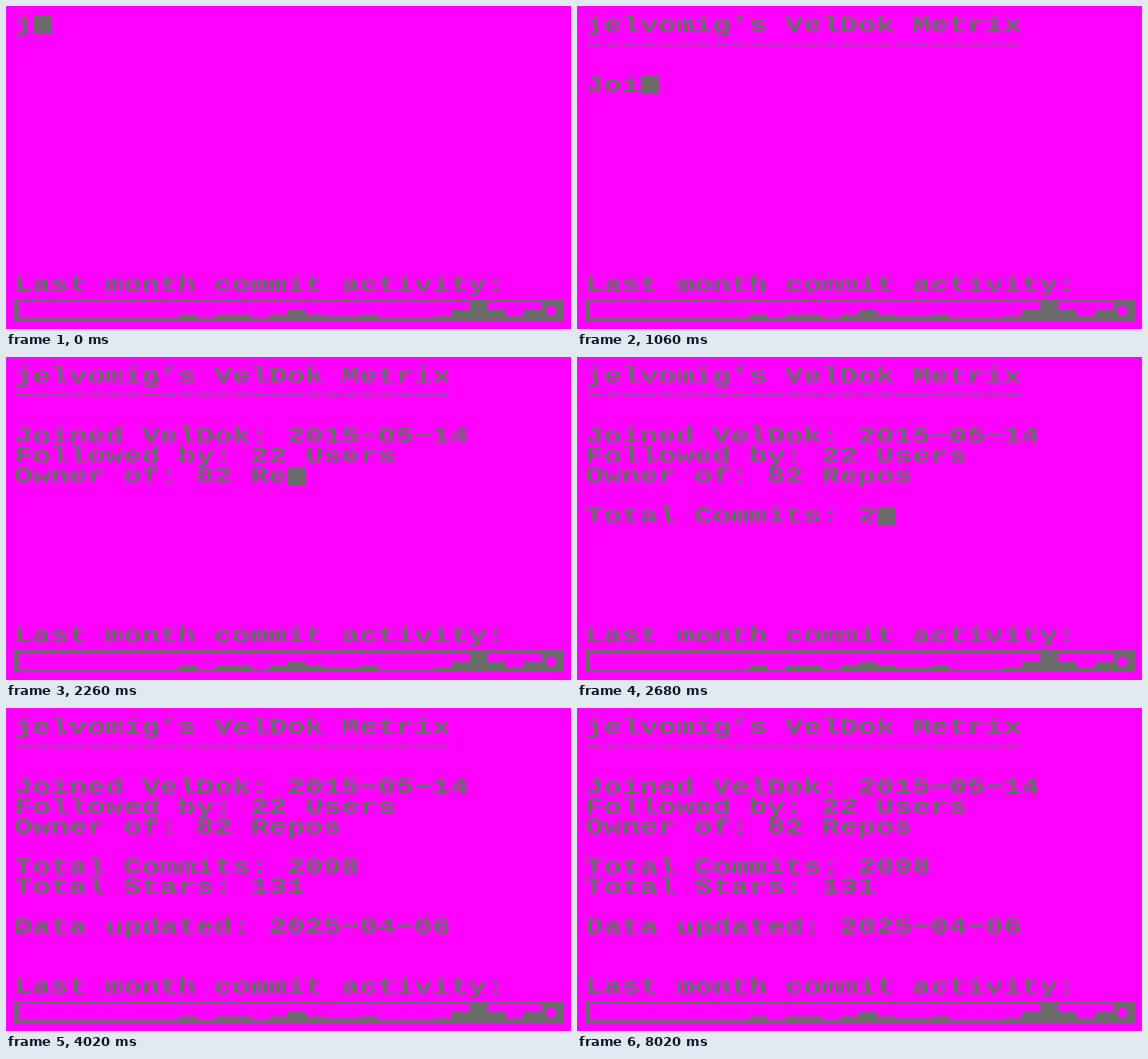
Animation, 622 px wide and 356 px high, one loop 8.42 s. Source, as an HTML page:

```html
<!DOCTYPE html>
<html lang="en">
<head>
<meta charset="utf-8">
<title>Commit metrics terminal</title>
<style>
  html, body { margin: 0; width: 100%; height: 100%; overflow: hidden; background: #f0f; }
  svg { display: block; width: 100vw; height: 100vh; fill: #696969; }
  text {
    font: bold 25px "Liberation Mono", "Courier New", monospace;
    white-space: pre;
    text-rendering: geometricPrecision;
  }
  .rule { font-weight: normal; }
  rect { shape-rendering: crispEdges; }
</style>
</head>
<body>
<svg viewBox="0 0 622 356">
  <rect width="622" height="356" fill="#f0f"/>
  <!-- wide terminal face: 20px columns, 22px rows -->
  <g id="rows" transform="translate(9 27.6) scale(1.3333 1)"></g>
  <g id="chart"></g>
  <rect id="cursor" width="20" height="20"/>
</svg>
<script>
const NS = "http://www.w3.org/2000/svg";
const LOOP = 8420, STEP = 20, BLINK_START = 4020, BLINK = 400;
const COL = 20, ROW = 22, LEFT = 10;

const script = [
  "jelvomig\u2019s VelDok Metrix",
  "-".repeat(24),
  "",
  "Joined VelDok: 2015-05-14",
  "Followed by: 22 Users",
  "Owner of: 82 Repos",
  "",
  "Total Commits: 2098",
  "Total Stars: 131",
  "",
  "Data updated: 2025-04-06"
];
const full = script.join("\n");

const rowsBox = document.getElementById("rows");
const chart = document.getElementById("chart");
const cursor = document.getElementById("cursor");

function add(parent, tag, attrs) {
  const el = document.createElementNS(NS, tag);
  for (const key in attrs) el.setAttribute(key, attrs[key]);
  return parent.appendChild(el);
}

function box(x, y, width, height) {
  add(chart, "rect", { x, y, width, height });
}

const rows = script.map((line, i) =>
  add(rowsBox, "text", { y: i * ROW, class: line.startsWith("-") ? "rule" : "" }));
add(rowsBox, "text", { y: 13 * ROW }).textContent = "Last month commit activity:";

function drawChart() {
  const left = 9, right = 614, top = 323, bottom = 347;
  box(left, top, right - left, 3);
  box(left, bottom - 3, right - left, 3);
  box(left, top, 5, bottom - top);
  box(right - 4, top, 4, bottom - top);
  // bar heights by column, starting at column 9
  const bars = [7, 0, 7, 7, 0, 7, 12, 7, 5, 5, 7, 0, 0, 0, 5, 12, 24, 12, 5, 12, 24];
  bars.forEach((h, i) => {
    if (h) box(LEFT + (i + 9) * COL, bottom - h, COL, h);
  });
  add(chart, "ellipse", { cx: 600, cy: 335.5, rx: 5.5, ry: 5.5, fill: "#f0f" });
}

function draw(time) {
  const t = time % LOOP;
  const count = Math.min(full.length, Math.floor(t / STEP) + 1);
  const typed = full.slice(0, count).split("\n");
  rows.forEach((row, i) => {
    const line = (typed[i] || "").replace(/-/g, "\u2212");
    if (row.textContent !== line) row.textContent = line;
  });

  const last = typed.length - 1;
  cursor.setAttribute("x", LEFT + typed[last].length * COL);
  cursor.setAttribute("y", 11 + last * ROW);
  const on = t < BLINK_START || Math.floor((t - BLINK_START) / BLINK) % 2 === 1;
  cursor.setAttribute("visibility", on ? "visible" : "hidden");
}

function tick() {
  draw(performance.now());
  requestAnimationFrame(tick);
}

drawChart();
tick();
</script>
</body>
</html>
```
